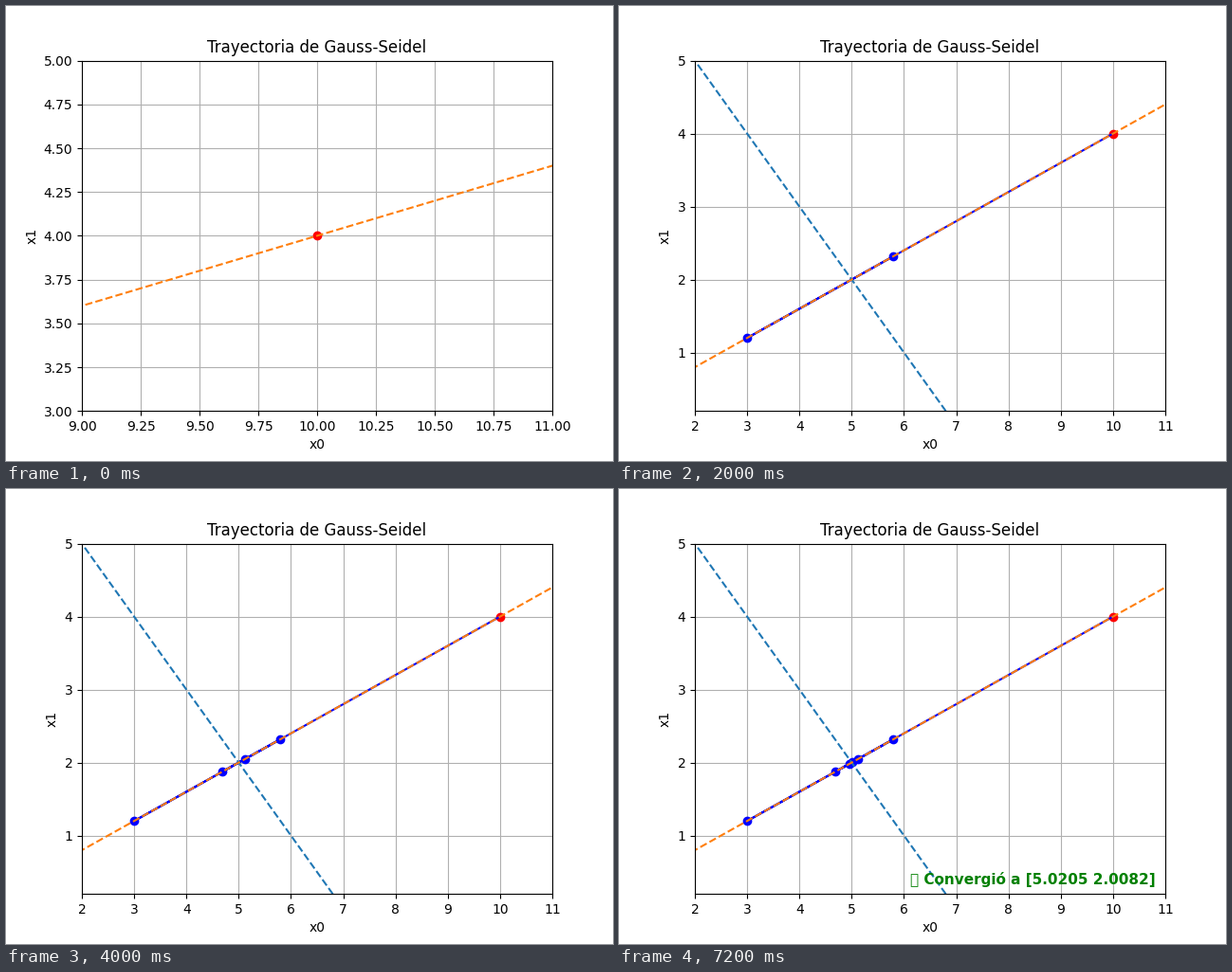
A matplotlib script that plays this animation: 640x480 px, repeating every 8 s.

```python
import numpy as np
import matplotlib.pyplot as plt
from matplotlib.animation import FuncAnimation

plt.rcParams["font.family"] = "DejaVu Sans"

STEPS = 6
FRAMES = 8


def gauss_seidel(start, steps):
    """Iterate x0 + x1 = 7, 2*x0 - 5*x1 = 0."""
    points = [start]
    for _ in range(steps):
        x0 = 7 - points[-1][1]
        points.append((x0, 0.4 * x0))
    return np.array(points)


path = gauss_seidel((10.0, 4.0), STEPS)
span = np.array([-20.0, 20.0])

fig, ax = plt.subplots(figsize=(6.4, 4.8), dpi=100)


def draw(frame):
    step = min(frame, STEPS)
    x, y = path[:step + 1].T

    ax.clear()
    ax.plot(x[0], y[0], "ro")
    if step:
        ax.plot(x, y, "b-")
        ax.plot(x[1:], y[1:], "bo")
    ax.plot(span, 7 - span, "--", color="tab:blue")
    ax.plot(span, 0.4 * span, "--", color="tab:orange")

    ax.set_xlim(x.min() - 1, x.max() + 1)
    ax.set_ylim(y.min() - 1, y.max() + 1)
    ax.set_title("Trayectoria de Gauss-Seidel")
    ax.set_xlabel("x0")
    ax.set_ylabel("x1")
    ax.grid(True)

    if step == STEPS:
        ax.text(0.98, 0.02, f"\u2705 Convergió a [{x[-1]:.4f} {y[-1]:.4f}]",
                transform=ax.transAxes, ha="right", va="bottom",
                fontsize=11, fontweight="bold", color="green")
    return []


anim = FuncAnimation(fig, draw, frames=FRAMES, init_func=lambda: draw(0),
                     interval=1000, repeat=True, repeat_delay=0)
plt.show()
```
